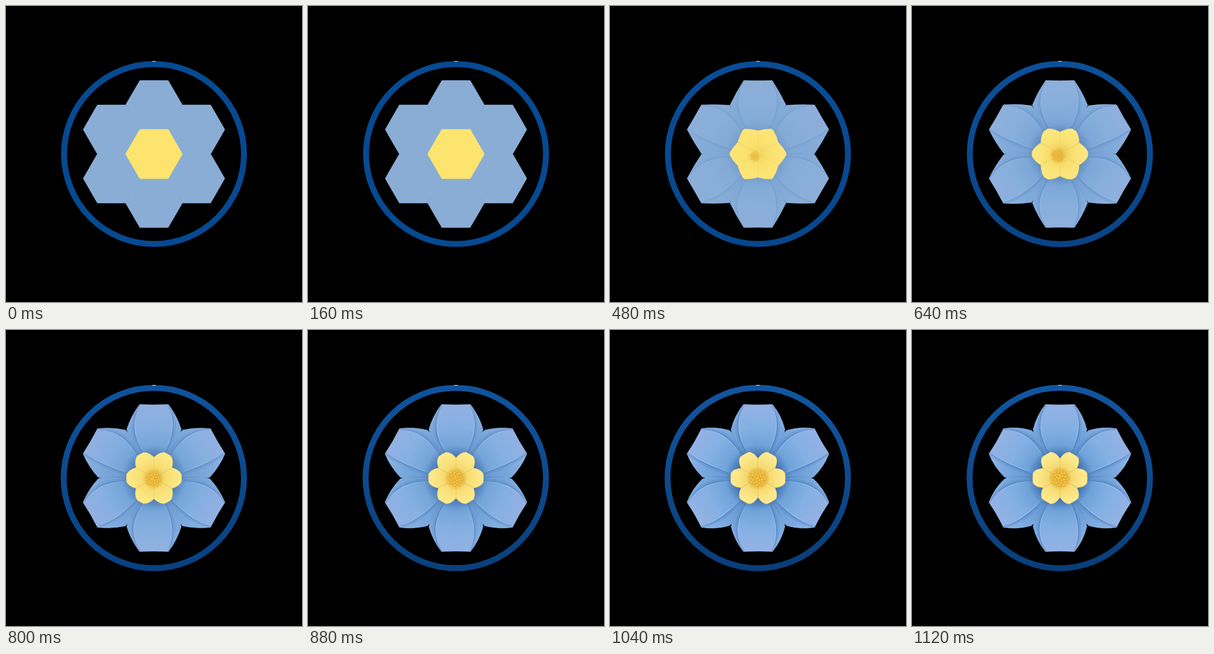
An HTML page with a canvas for the animation above (1160 ms loop, 500 by 500 pixels).

```html
<!DOCTYPE html>
<html lang="en">
<head>
<meta charset="utf-8">
<title>Blooming flower</title>
<style>
  html, body { margin: 0; width: 100%; height: 100%; overflow: hidden; background: #000; }
  canvas { display: block; width: 500px; height: 500px; }
</style>
</head>
<body>
<canvas id="stage" width="500" height="500"></canvas>
<script>
const ctx = document.getElementById('stage').getContext('2d');
const LOOP = 1160, STEP = 40, RAD = Math.PI / 180;
const BLUE = [138, 173, 213], YELLOW = [252, 228, 110];

const mix = (a, b, t) => a + (b - a) * t;
const tint = (a, b, t) => `rgb(${a.map((v, i) => Math.round(mix(v, b[i], t)))})`;
const smooth = (a, b, x) => {
  const t = Math.min(1, Math.max(0, (x - a) / (b - a)));
  return t * t * (3 - 2 * t);
};
const polar = (deg, r) => [Math.cos(deg * RAD) * r, Math.sin(deg * RAD) * r];

// Radial gradient around the flower's middle, blended from a flat colour.
function shade(flat, stops, t) {
  const g = ctx.createRadialGradient(0, 0, 0, 0, 0, 130);
  for (const [r, rgb] of stops) g.addColorStop(r / 130, tint(flat, rgb, t));
  return g;
}

const FLAP = [[38, [84, 132, 190]], [62, [106, 156, 212]], [90, [119, 167, 221]], [126, [145, 182, 231]]];
const FACE = [[38, [90, 142, 202]], [58, [113, 164, 218]], [86, [132, 176, 227]], [126, [149, 178, 229]]];
const CUP = [[8, [226, 184, 70]], [20, [246, 217, 112]], [34, [251, 229, 133]], [48, [253, 236, 152]]];

// Angle of each blue petal and the spread of its left and right folds.
const PETALS = [
  [60, 46, 25], [300, 25, 46], [120, 46, 32], [240, 32, 46], [180, 42, 50], [0, 47, 44]
];

function petalOutline(t) {
  const tip = [mix(24, 24.5, t), -124.3];
  const outer = [mix(36, 39.5, t), mix(-104, -106, t)];
  const side = [mix(48, 45.5, t), mix(-83, -82, t)];
  const inner = [mix(36, 43, t), mix(-62, -65, t)];
  const base = [mix(24, 20, t), mix(-41.5, -34, t)];
  ctx.beginPath();
  ctx.moveTo(-base[0], base[1]);
  ctx.quadraticCurveTo(-inner[0], inner[1], -side[0], side[1]);
  ctx.quadraticCurveTo(-outer[0], outer[1], -tip[0], tip[1]);
  ctx.quadraticCurveTo(0, mix(-124.3, -122.5, t), tip[0], tip[1]);
  ctx.quadraticCurveTo(outer[0], outer[1], side[0], side[1]);
  ctx.quadraticCurveTo(inner[0], inner[1], base[0], base[1]);
  ctx.closePath();
}

function foldLine(side, spread) {
  ctx.beginPath();
  ctx.moveTo(side * 24, -124);
  ctx.quadraticCurveTo(side * spread, -82, side * 15, -38);
}

function drawPetal([deg, left, right], t) {
  ctx.save();
  ctx.rotate(deg * RAD);
  petalOutline(t);
  ctx.fillStyle = shade(BLUE, FLAP, t);
  ctx.fill();
  ctx.lineWidth = 0.7;
  ctx.strokeStyle = shade(BLUE, [[60, [70, 116, 174]], [84, [118, 160, 212]], [126, [176, 203, 240]]], t);
  ctx.globalAlpha = mix(0.5, 0.8, t);
  ctx.stroke();
  ctx.clip();

  ctx.globalAlpha = 1;
  ctx.beginPath();
  ctx.moveTo(-15, -38);
  ctx.quadraticCurveTo(-left, -82, -24, -124);
  ctx.lineTo(0, -127);
  ctx.lineTo(24, -124);
  ctx.quadraticCurveTo(right, -82, 15, -38);
  ctx.closePath();
  ctx.fillStyle = shade(BLUE, FACE, t);
  ctx.fill();

  // Dark crease with a soft highlight just inside it.
  for (const [side, spread] of [[-1, left], [1, right]]) {
    for (const [shift, width, colour, alpha] of [
      [5, 5, '#4479b8', 0.22], [0.8, 1.6, '#3a6bab', 0.5], [-2.4, 2, '#a9cbf3', 0.3]
    ]) {
      foldLine(side, spread + shift);
      ctx.globalAlpha = alpha * t;
      ctx.lineWidth = width;
      ctx.strokeStyle = colour;
      ctx.stroke();
    }
  }
  ctx.restore();
}

function cupPetal(deg, t) {
  const notch = mix(41.57, 33, t), flank = mix(14, 20, t), bulge = mix(43.25, 45, t);
  const corner = mix(0, 10, t), tip = mix(48, 46.5, t);
  ctx.beginPath();
  ctx.moveTo(0, 0);
  ctx.lineTo(...polar(deg - 30, notch));
  ctx.quadraticCurveTo(...polar(deg - flank, bulge), ...polar(deg - corner, tip));
  ctx.quadraticCurveTo(...polar(deg, tip), ...polar(deg + corner, tip));
  ctx.quadraticCurveTo(...polar(deg + flank, bulge), ...polar(deg + 30, notch));
  ctx.closePath();
}

function drawCup(t) {
  const g = ctx.createRadialGradient(0, 0, 32, 0, 0, 54);
  g.addColorStop(0, `rgba(40,84,142,${0.55 * t})`);
  g.addColorStop(1, 'rgba(40,84,142,0)');
  ctx.fillStyle = g;
  ctx.fillRect(-54, -54, 108, 108);

  for (let k = 0; k < 6; k++) {
    cupPetal(k * 60, t);
    ctx.fillStyle = shade(YELLOW, CUP, t);
    ctx.fill();
    ctx.lineWidth = 0.8;
    ctx.strokeStyle = tint(YELLOW, [222, 190, 100], t);
    ctx.globalAlpha = mix(1, 0.7, t);
    ctx.stroke();
    ctx.globalAlpha = 1;
  }
}

function drawStamens(t) {
  if (t <= 0) return;
  const size = 16 * t ** 0.4;
  ctx.save();
  ctx.translate(mix(-5, 0, smooth(0.2, 1, t)), mix(5, 0.5, t));
  ctx.scale(size / 16, size / 16);
  ctx.globalAlpha = Math.min(1, t * 1.4);
  const g = ctx.createRadialGradient(0, 0, 6, 0, 0, 20);
  g.addColorStop(0, 'rgba(228,172,44,.85)');
  g.addColorStop(1, 'rgba(228,172,44,0)');
  ctx.fillStyle = g;
  ctx.fillRect(-20, -20, 40, 40);
  for (let i = 25; i >= 0; i--) {
    const [x, y] = polar(i * 137.5, 2.7 * Math.sqrt(i));
    for (const [shift, r, colour] of [[0, 2.6, '#e0aa30'], [-0.4, 2.1, '#f0bf40'], [-0.8, 0.8, '#f7d267']]) {
      ctx.beginPath();
      ctx.arc(x + shift, y + shift, r, 0, 7);
      ctx.fillStyle = colour;
      ctx.fill();
    }
  }
  ctx.restore();
}

function drawRing(t) {
  const g = ctx.createLinearGradient(0, -157, 0, 157);
  g.addColorStop(0, tint([6, 74, 146], [18, 86, 160], t));
  g.addColorStop(1, tint([6, 74, 146], [9, 62, 122], t));
  ctx.beginPath();
  ctx.arc(mix(0, -0.4, t), 0, mix(152, 152.4, t), 0, 7);
  ctx.lineWidth = 10;
  ctx.strokeStyle = g;
  ctx.stroke();
  ctx.fillStyle = '#d5dfeb';
  ctx.fillRect(-3, -157, 6, 1);
}

function draw(ms) {
  const step = Math.floor((ms % LOOP) / STEP);
  const t = smooth(0.15, 0.95, step * STEP / LOOP);
  ctx.setTransform(1, 0, 0, 1, 0, 0);
  ctx.fillStyle = '#000';
  ctx.fillRect(0, 0, 500, 500);
  ctx.translate(250, 250);
  drawRing(t);
  ctx.beginPath();
  ctx.arc(0, 0, 82, 0, 7);
  ctx.fillStyle = tint(BLUE, [62, 106, 164], t);
  ctx.fill();
  for (const petal of PETALS) drawPetal(petal, t);
  drawCup(t);
  drawStamens(t);
}

const start = performance.now();
function tick() {
  draw(performance.now() - start);
  requestAnimationFrame(tick);
}
tick();
</script>
</body>
</html>
```
